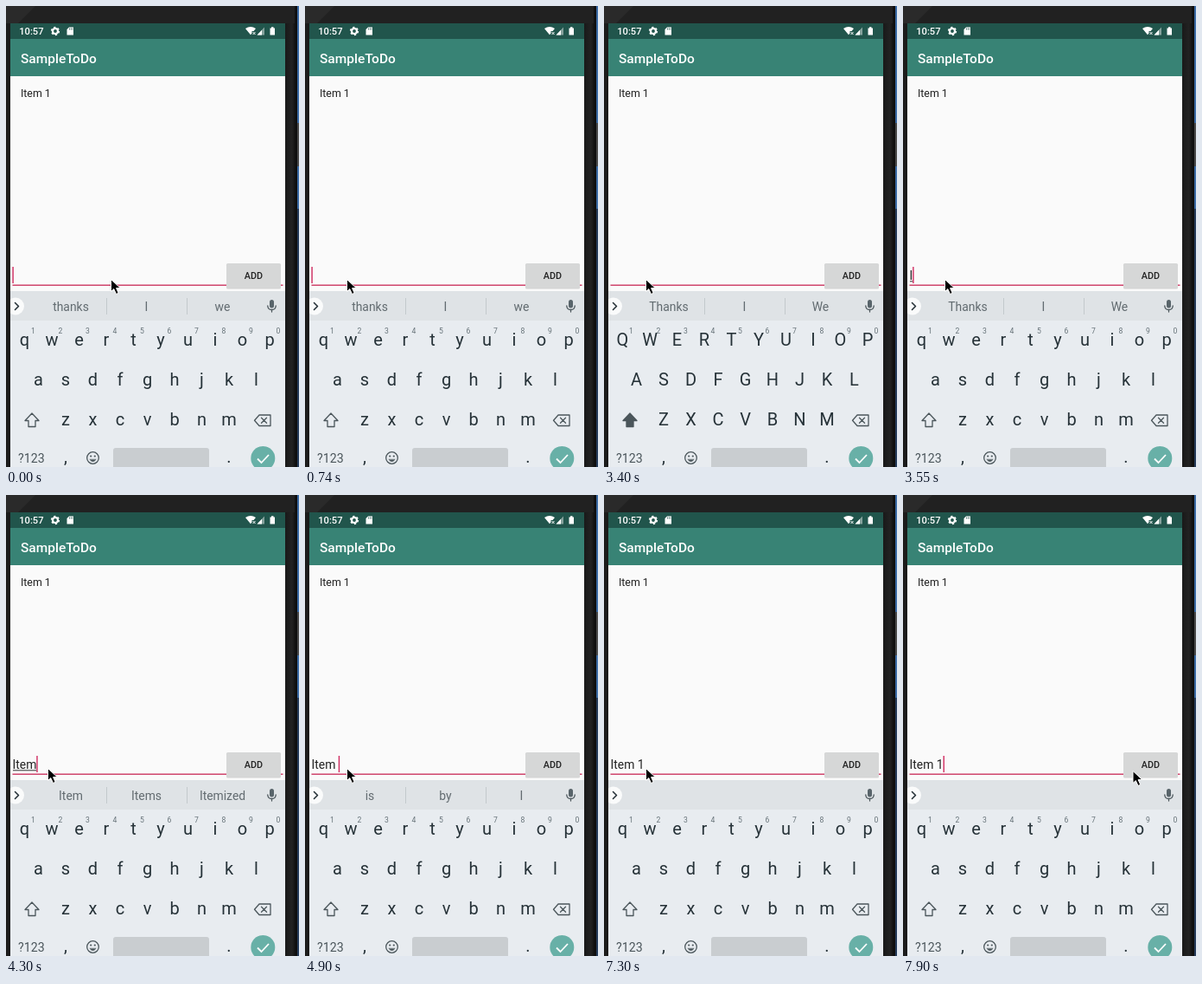
Recreate the animation shown at these times as an HTML page. Size 339 by 532 pixels, loop 8 s.

```html
<!DOCTYPE html>
<html lang="en">
<head>
<meta charset="utf-8">
<title>To-do entry</title>
<style>
  html, body { margin: 0; width: 100%; height: 100%; overflow: hidden; background: #202020; }
  svg { display: block; width: 339px; height: 532px; font-family: Roboto, sans-serif; }
  text { white-space: pre; }
  .mid { text-anchor: middle; }
  .word { font-size: 13.9px; fill: #626b70; }
  .key { font-size: 20px; fill: #263238; }
  .hint { font-size: 8.6px; fill: #667278; }
  .icon { fill: none; stroke: #4b565b; stroke-width: 1.3; stroke-linejoin: round; stroke-linecap: round; }
</style>
</head>
<body>
<svg viewBox="0 0 339 532">
  <defs>
    <linearGradient id="side">
      <stop offset="0" stop-color="#191919"/><stop offset=".6" stop-color="#222"/><stop offset="1" stop-color="#0d0d0d"/>
    </linearGradient>
    <clipPath id="screen"><rect x="5" y="20" width="318" height="512"/></clipPath>
  </defs>

  <!-- Device frame -->
  <rect width="339" height="532" fill="#212121"/>
  <path d="M0 0H34L14 20H0Z" fill="#2a2a2a"/>
  <path d="M0 20H5V532H0Z" fill="#1b1b1b"/>
  <rect x="323" y="20" width="13" height="512" fill="url(#side)"/>
  <rect x="334" width="3" height="532" fill="#101010"/>
  <rect x="337" width="2" height="532" fill="#3b6ba5"/>
  <rect x="337" y="135" width="2" height="50" fill="#4a4a4a"/>
  <rect x="337" y="234" width="2" height="298" fill="#263c5b"/>

  <!-- App -->
  <g clip-path="url(#screen)">
    <rect x="5" y="81" width="318" height="248" fill="#fafafa"/>
    <rect x="5" y="38" width="318" height="43" fill="#388375"/>
    <rect x="5" y="20" width="318" height="18" fill="#21554c"/>
    <g fill="#fff">
      <text x="15.2" y="33" font-size="11.2" font-weight="500">10:57</text>
      <circle cx="57" cy="29" r="3" fill="none" stroke="#fff" stroke-width="2.2"/>
      <circle cx="57" cy="29" r="4.5" fill="none" stroke="#fff" stroke-width="1.3" stroke-dasharray="2.3 2.41"/>
      <path d="M73 24.5H78V33.5H70.5V27Z"/>
      <path d="M73.5 25.5v2M75.2 25.5v2M76.8 25.5v2" stroke="#21554c" stroke-width=".7"/>
      <path d="M277 26Q283 22 289 26L286.5 29H284.5V31.5L283 33.2Z"/>
      <path d="M285.5 30l3 3m0-3l-3 3" stroke="#fff" stroke-width="1"/>
      <path d="M299 24.5V33.5H290.5Z" opacity=".45"/>
      <path d="M296 27.7V33.5H290.5Z"/>
      <path d="M305.5 25.5H307V24.3H309.500V25.500H311V33.500H305.500Z"/>
      <text x="17" y="66" font-size="15.5" font-weight="500">SampleToDo</text>
    </g>
    <text x="16.900" y="104.500" font-size="12.400" fill="#222">Item 1</text>

    <rect x="7.500" y="321.500" width="313" height="1.400" fill="#cd3863"/>
    <text id="entry" x="7.500" y="316" font-size="13.900" fill="#222"></text>
    <rect id="underline" x="8" y="317.300" height="1" fill="#333"/>
    <rect id="caret" y="301" width="1.400" height="19" fill="#d02c60"/>
    <rect x="255" y="298" width="63" height="28.500" rx="1.500" fill="#b9baba" opacity=".6"/>
    <rect x="255" y="297" width="63" height="28.500" rx="1.500" fill="#d6d7d7"/>
    <text class="mid" x="286.500" y="315" font-size="10.800" font-weight="500" fill="#222">ADD</text>

    <!-- Keyboard -->
    <rect x="5" y="329" width="318" height="34" fill="#dfe3e6"/>
    <rect x="5" y="363" width="318" height="169" fill="#e8ecf0"/>
    <circle cx="11" cy="346.500" r="10" fill="#fafbfb"/>
    <path class="icon" d="M10.500 342.500L14.500 346.500L10.500 350.500" style="stroke:#263238;stroke-width:1.600"/>
    <path id="dividers" d="M116.500 337V356M209.500 337V356" stroke="#c3c9cc"/>
    <g id="words"></g>
    <rect x="305" y="339" width="5" height="9.500" rx="2.500" fill="#58646a"/>
    <path class="icon" d="M302.800 346C303 352 312 352 312.200 346M307.500 350.500V353"/>
    <g id="keys"></g>
    <path id="shift" class="icon" d="M30 470L38 478.500H34V485.500H26V478.500H22Z"/>
    <path class="icon" d="M293 472H306V484.500H293L287.500 478.200ZM295.500 475.200L301.500 481.200M301.500 475.200L295.500 481.200"/>
    <text x="14" y="526.500" font-size="14.200" fill="#4b565b">?123</text>
    <text class="key mid" x="69" y="527">,</text>
    <text class="key mid" x="258" y="527">.</text>
    <circle class="icon" cx="100.500" cy="521.500" r="6.800"/>
    <path class="icon" d="M97 523.500Q100.500 528 104 523.500Z" style="fill:#4b565b;stroke-width:.6"/>
    <circle cx="98.200" cy="519.500" r="1.100" fill="#4b565b"/>
    <circle cx="102.800" cy="519.500" r="1.100" fill="#4b565b"/>
    <rect x="124" y="510" width="111" height="26" rx="3" fill="#c9cdd0"/>
    <circle cx="297.300" cy="522" r="14" fill="#68b0a7"/>
    <path d="M291 522.500L295.500 527L304 518" fill="none" stroke="#fff" stroke-width="1.800"/>
  </g>

  <path id="pointer" d="M.5 .5V14.500L3.800 11.600L6.500 17.500L9.200 16.300L6.600 10.600H11.300Z" fill="#000" stroke="#fff"/>
</svg>
<script>
const $ = id => document.getElementById(id);
const LOOP = 8000;

function addText(parent, cls, x, y, value = '') {
  const el = document.createElementNS('http://www.w3.org/2000/svg', 'text');
  el.setAttribute('class', cls + ' mid');
  el.setAttribute('x', x);
  el.setAttribute('y', y);
  el.textContent = value;
  return parent.appendChild(el);
}

const PITCH = 31.5;
const letters = [['qwertyuiop', 21.5, 392], ['asdfghjkl', 37.5, 438], ['zxcvbnm', 69, 484]]
  .flatMap(([row, x, y]) => [...row].map((c, i) => ({ c, el: addText($('keys'), 'key', x + i * PITCH, y, c) })));
[...'1234567890'].forEach((c, i) => addText($('keys'), 'hint', 31.5 + i * PITCH, 377.5, c));
const words = [75, 162.5, 250.5].map(x => addText($('words'), 'word', x, 352));

// Each step changes only the properties it names.
const steps = [
  [0, { text: '', caret: true, caps: false, composing: false, words: ['thanks', 'I', 'we'], pointer: [121, 315] }],
  [140, { caret: false, pointer: [109, 314] }],
  [440, { pointer: [94, 319] }],
  [590, { pointer: [47, 316] }],
  [740, { caret: true, pointer: [48, 315] }],
  [1180, { caret: false }],
  [1750, { caret: true }],
  [2200, { caret: false }],
  [2650, { caret: true }],
  [3400, { caret: false, caps: true, words: ['Thanks', 'I', 'We'] }],
  [3550, { text: 'I', caret: true, caps: false, composing: true }],
  [3700, { text: 'It' }],
  [3850, { text: 'Ite', words: ['Ite', 'Item', 'Items'] }],
  [4300, { text: 'Item', words: ['Item', 'Items', 'Itemized'] }],
  [4750, { caret: false }],
  [4900, { text: 'Item ', caret: true, composing: false, words: ['is', 'by', 'I'] }],
  [5350, { caret: false }],
  [5800, { text: 'Item 1', caret: true, words: [] }],
  [6250, { caret: false }],
  [6850, { caret: true }],
  [7300, { caret: false }],
  [7600, { pointer: [84, 305] }],
  [7750, { caret: true, pointer: [199, 306] }],
  [7900, { pointer: [265.5, 318] }],
];

const show = (el, on) => el.setAttribute('visibility', on ? 'visible' : 'hidden');

function render(time) {
  const s = Object.assign({}, ...steps.filter(([at]) => at <= time).map(([, change]) => change));
  $('entry').textContent = s.text;
  const width = s.text ? $('entry').getComputedTextLength() : 0;
  $('caret').setAttribute('x', 7.4 + width);
  $('underline').setAttribute('width', Math.max(0, width - 0.5));
  show($('caret'), s.caret);
  show($('underline'), s.composing);
  show($('dividers'), s.words.length);
  words.forEach((el, i) => { el.textContent = s.words[i] || ''; });
  letters.forEach(({ c, el }) => { el.textContent = s.caps ? c.toUpperCase() : c; });
  $('shift').style.fill = s.caps ? '#4b565b' : 'none';
  $('pointer').setAttribute('transform', `translate(${s.pointer})`);
}

const start = performance.now();
let shown = -1;
function tick() {
  const time = (performance.now() - start) % LOOP;
  const index = steps.filter(([at]) => at <= time).length;
  if (index !== shown) render(time);
  shown = index;
  requestAnimationFrame(tick);
}
tick();
</script>
</body>
</html>
```
